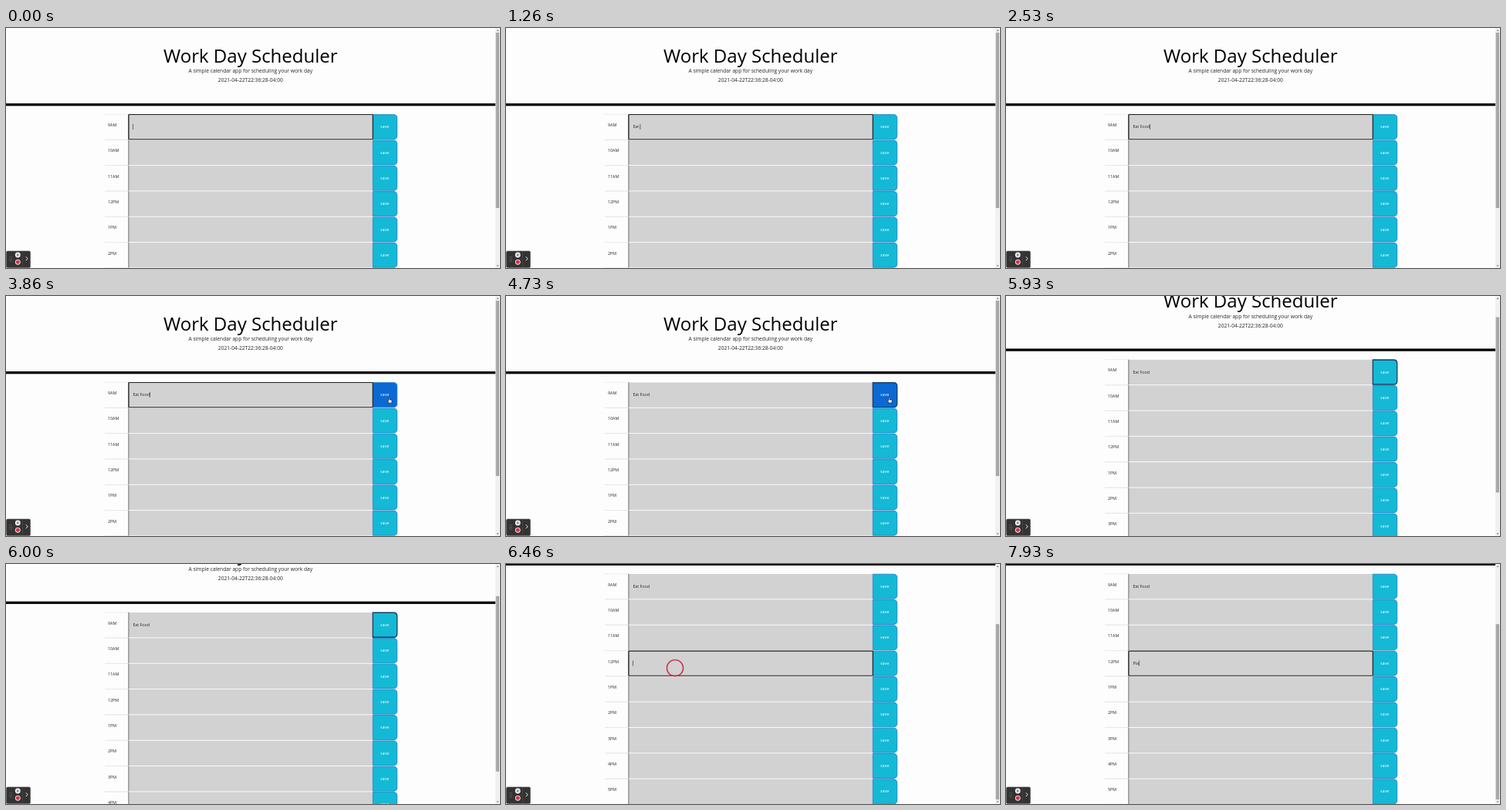
An HTML page for the animation above (8000 ms loop, 640 px wide and 312 px high).

```html
<!DOCTYPE html>
<html lang="en">
<head>
<meta charset="utf-8">
<title>Work Day Scheduler</title>
<style>
html, body { margin: 0; width: 100%; height: 100%; overflow: hidden; background: #fdfdfd; }
svg { display: block; width: 640px; height: 312px; }
text { font-family: "Open Sans", sans-serif; font-size: 5.333px; fill: #212529; white-space: pre; }
.mid { text-anchor: middle; }
.sub { font-size: 6.667px; }
.save { fill: #fff; }
</style>
</head>
<body>
<svg id="stage" viewBox="0 0 640 312">
  <rect width="640" height="312" fill="#fdfdfd"/>
  <g id="page">
    <text class="mid" x="316.8" y="45" style="font-size:24px;fill:#000">Work Day Scheduler</text>
    <text class="mid sub" x="316.8" y="58.2">A simple calendar app for scheduling your work day</text>
    <text class="mid sub" x="316.8" y="70.4">2021-04-22T22:36:28-04:00</text>
    <rect y="98" width="634" height="3.3"/>
    <g id="rows"></g>
    <rect id="focus" x="158.9" width="316.4" height="32.2" rx="0.8" fill="none" stroke="#1c1c1c" stroke-width="1.1"/>
    <rect id="caret" width="0.6" height="7" fill="#222"/>
  </g>
  <rect x="634" width="6" height="312" fill="#f1f1f1"/>
  <rect id="thumb" x="634.6" width="4.4" height="228" fill="#a8a8a8"/>
  <path d="M635.6 3.8l1.4-1.6 1.4 1.6zM635.6 308.4l1.4 1.6 1.4-1.6z" fill="#505050"/>
  <g id="widget">
    <rect x="0.5" y="290" width="31" height="21.5" rx="1.5" fill="#333" stroke="#555" stroke-width="0.6"/>
    <path d="M21.5 290.5v20.5" stroke="#555" stroke-width="0.5"/>
    <path d="M5.2 297.5v6M7.2 297.5v6" stroke="#aaa" stroke-width="0.8" stroke-dasharray="0.8 1.7"/>
    <circle cx="15.3" cy="295" r="3.4" fill="#f4f4f4"/>
    <path d="M14.5 293.5v3M16.1 293.5v3" stroke="#444" stroke-width="0.8"/>
    <circle cx="15.3" cy="304.3" r="3.4" fill="#f4f4f4"/>
    <circle cx="15.3" cy="304.3" r="2.5" fill="#d4304a"/>
    <path d="M25.8 297.3l2.3 2.5-2.3 2.5" fill="none" stroke="#fff" stroke-width="0.9"/>
  </g>
  <circle id="ring" r="10.6" fill="none" stroke="#cf2b45" stroke-width="1.4"/>
  <path id="hand" d="M0 0.6Q0.7-0.2 1.3 0.6V3L4 3.6Q4.7 3.9 4.5 5L3.9 7.4H0.6L-1.2 4.8Q-1.2 3.8 0 4.4z" fill="#fff" stroke="#000" stroke-width="0.6"/>
  <path id="arrow" d="M0 0v6.8l1.6-1.4 1.1 2.5 1.1-.5-1.1-2.4H5z" fill="#fff" stroke="#000" stroke-width="0.6"/>
</svg>
<script>
const LOOP = 8000, TOP = 112.2, PITCH = 33.33, MAX_SCROLL = 99.4;
const NS = "http://www.w3.org/2000/svg";
const $ = id => document.getElementById(id);

function add(parent, tag, attrs, label = "") {
  const el = document.createElementNS(NS, tag);
  for (const k in attrs) el.setAttribute(k, attrs[k]);
  el.textContent = label;
  return parent.appendChild(el);
}

const hours = ["9AM", "10AM", "11AM", "12PM", "1PM", "2PM", "3PM", "4PM", "5PM"];
const rows = hours.map((hour, i) => {
  const g = add($("rows"), "g", { transform: `translate(0 ${TOP + i * PITCH})` });
  add(g, "path", { d: "M128 0H158.5M128 32.9H158.5", stroke: "#e6e6e6", "stroke-width": 0.7 });
  add(g, "text", { x: 132, y: 15.8 }, hour);
  add(g, "rect", { x: 158.6, y: 0.2, width: 316.4, height: 32.4, fill: "#d2d2d2" });
  add(g, "path", { d: "M158.9 0V32.8", stroke: "#444", "stroke-width": 0.7 });
  const button = add(g, "path", {
    d: "M475.3 .4H502Q506.7 .4 506.7 5V27.8Q506.7 32.4 502 32.4H475.3z", "stroke-width": 0.8
  });
  add(g, "text", { class: "mid save", x: 490.6, y: 18 }, "save");
  const note = add(g, "text", { x: 164.4, y: 18.1 });
  return { button, note };
});

const entries = [
  { row: 0, text: "Eat Food", from: 0, to: 4200, keys: [600, 780, 1000, 1200, 1400, 1660, 2000, 2430] },
  { row: 3, text: "Pla", from: 6400, to: LOOP, keys: [7330, 7600, 7860] }
];

// Linear interpolation through [time, value] stops
function track(t, stops) {
  if (t <= stops[0][0]) return stops[0][1];
  for (let i = 1; i < stops.length; i++) {
    const [a, u] = stops[i - 1], [b, v] = stops[i];
    if (t < b) return u + (v - u) * (t - a) / (b - a);
  }
  return stops[stops.length - 1][1];
}

const within = (t, a, b) => t >= a && t < b;
const show = (el, on) => el.setAttribute("visibility", on ? "visible" : "hidden");
const place = (el, x, y) => el.setAttribute("transform", `translate(${x} ${y})`);

function drawEntry(t, e) {
  const typed = e.keys.filter(k => t >= k);
  const note = rows[e.row].note;
  note.textContent = e.text.slice(0, typed.length);
  if (!within(t, e.from, e.to)) return false;
  const y = TOP + e.row * PITCH;
  const last = typed.length ? typed[typed.length - 1] : e.from;
  const width = typed.length ? note.getComputedTextLength() : 0;
  $("focus").setAttribute("y", y + 0.3);
  $("caret").setAttribute("x", 164.4 + width);
  $("caret").setAttribute("y", y + 12.8);
  show($("caret"), (t - last) % 1060 < 530);
  return true;
}

function draw(t) {
  const scroll = track(t, [[5800, 0], [5930, 29.3], [6060, 66], [6180, 90], [6280, MAX_SCROLL]]);
  place($("page"), 0, -scroll);
  $("thumb").setAttribute("y", 6 + scroll * 0.726);

  const active = entries.map(e => drawEntry(t, e)).some(Boolean);
  show($("focus"), active);
  if (!active) show($("caret"), false);

  const hover = within(t, 3600, 4780), pressed = within(t, 4200, 6400);
  rows.forEach(({ button }, i) => {
    const focused = i === 0 && pressed;
    button.setAttribute("fill", i === 0 && hover ? "#0b69d3" : "#14b9d5");
    button.setAttribute("stroke", focused ? "#133a63" : "#1d78c8");
    button.setAttribute("stroke-width", focused ? 1.3 : 0.8);
  });

  const x = track(t, [[3300, 511], [3700, 495.6], [4730, 495.6], [5500, 570]]);
  const y = track(t, [[3300, 152], [3700, 131.8], [4730, 131.8], [5500, 28]]);
  for (const id of ["hand", "arrow"]) place($(id), x, y);
  show($("hand"), hover);
  show($("arrow"), within(t, 3300, 5530) && !hover);

  const first = within(t, 4200, 4500);
  show($("ring"), first || within(t, 6400, 6700));
  place($("ring"), first ? 496 : 219, 135.2);
}

function frame(now) {
  draw(now % LOOP);
  requestAnimationFrame(frame);
}
draw(0);
requestAnimationFrame(frame);
</script>
</body>
</html>
```
